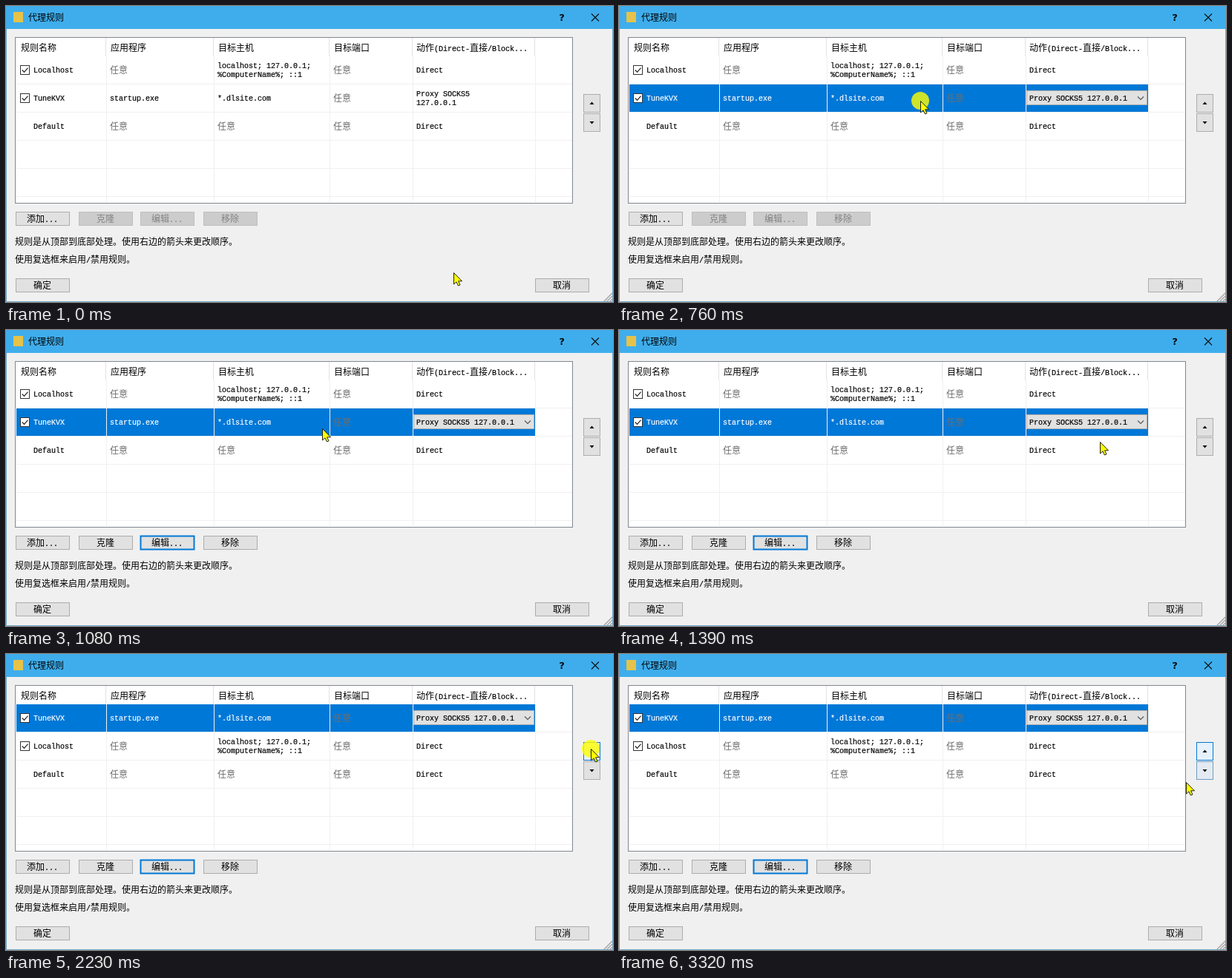
These frames come from a looping animation (818 by 400 pixels, 3.4 s). An HTML page:

```html
<!DOCTYPE html>
<html lang="zh-CN">
<head>
<meta charset="utf-8">
<title>代理规则</title>
<style>
html, body { margin: 0; width: 100%; height: 100%; overflow: hidden; background: #f0f0f0; }
svg { display: block; }
text {
  font: 10px "Liberation Mono", "DejaVu Sans Mono", monospace;
  fill: currentColor; stroke: currentColor; stroke-width: .2px; white-space: pre;
}
.zh { font: 12px "Noto Sans CJK SC", "Noto Sans CJK", sans-serif; stroke-width: 0; }
.mid { text-anchor: middle; }
.any { fill: #6d6d6d; }
.grid { stroke: #f0f0f0; fill: none; }
.btn rect { fill: #e1e1e1; stroke: #adadad; }
.arrow { fill: #000; }

/* One shared 3.4 s loop; every change is a hard step. */
.anim { animation: 3.4s step-end infinite; }
#cursor { animation-name: move; }
#click { animation-name: click; fill: #ff0; }
#mark, #combo { animation-name: select; }
#action { animation-name: deselect; }
#tuneText { animation-name: invert; }
#local { animation-name: down; }
#tune { animation-name: up; }
.late { animation-name: enable; }
.late rect { animation: enableBox 3.4s step-end infinite; }
#edit rect { animation-name: focusBox; }
#upBtn { animation-name: hoverUp; }
#downBtn { animation-name: hoverDown; }

@keyframes move {
  0% { transform: translate(603px, 360px); }
  6.17% { transform: translate(598px, 352px); }
  8.52% { transform: translate(571px, 313px); }
  10.88% { transform: translate(527px, 255px); }
  12.94% { transform: translate(483px, 200px); }
  15.29% { transform: translate(450px, 162px); }
  17.64% { transform: translate(426px, 142px); }
  20.29% { transform: translate(412px, 132px); }
  22.35% { transform: translate(406px, 128px); }
  29.41% { transform: translate(409px, 129px); }
  31.76% { transform: translate(426px, 133px); }
  33.82% { transform: translate(460px, 138px); }
  36.17% { transform: translate(507px, 143px); }
  38.52% { transform: translate(577px, 149px); }
  40.88% { transform: translate(648px, 151px); }
  43.23% { transform: translate(700px, 148px); }
  45.29% { transform: translate(736px, 142px); }
  47.64% { transform: translate(758px, 136px); }
  49.7% { transform: translate(770px, 132px); }
  52.05% { transform: translate(777px, 129px); }
  54.41% { transform: translate(784px, 128px); }
  56.47% { transform: translate(788px, 128px); }
  88.52% { transform: translate(787px, 132px); }
  90.88% { transform: translate(783px, 143px); }
  93.23% { transform: translate(776px, 156px); }
  95.29% { transform: translate(769px, 167px); }
  97.64%, 100% { transform: translate(764px, 173px); }
}
@keyframes click {
  0%, 27.35%, 70.29%, 100% { opacity: 0; }
  22.35%, 65.58% { opacity: .8; }
  24.7%, 67.94% { opacity: .5; }
}
@keyframes select { 0% { visibility: hidden; } 22.35%, 100% { visibility: visible; } }
@keyframes deselect { 0% { visibility: visible; } 22.35%, 100% { visibility: hidden; } }
@keyframes invert { 0% { color: #000; } 22.35%, 100% { color: #fff; } }
@keyframes down { 0% { transform: none; } 65.58%, 100% { transform: translateY(38px); } }
@keyframes up { 0% { transform: translateY(38px); } 65.58%, 100% { transform: none; } }
@keyframes enable { 0% { color: #838383; } 27.35%, 100% { color: #000; } }
@keyframes enableBox {
  0% { fill: #ccc; stroke: #bfbfbf; }
  27.35%, 100% { fill: #e1e1e1; stroke: #adadad; }
}
@keyframes focusBox {
  0% { fill: #ccc; stroke: #bfbfbf; stroke-width: 1px; }
  27.35%, 100% { fill: #e1e1e1; stroke: #0078d7; stroke-width: 2px; }
}
@keyframes hoverUp {
  0% { fill: #e1e1e1; stroke: #adadad; }
  54.41% { fill: #e3e9ee; stroke: #5793c2; }
  56.47%, 100% { fill: #e5f1fb; stroke: #0078d7; }
}
@keyframes hoverDown {
  0% { fill: #e1e1e1; stroke: #adadad; }
  93.23% { fill: #e4edf5; stroke: #4a92cb; }
  97.64%, 100% { fill: #e3eaf1; stroke: #6f9dc1; }
}
</style>
</head>
<body>
<svg width="818" height="400" viewBox="0 0 818 400">
  <defs>
    <g id="check">
      <rect x="19.5" y="80.5" width="12" height="12" fill="#fff" stroke="#333"/>
      <path d="M21.8 86.5l2.7 2.8 5-5.6" fill="none" stroke="#222" stroke-width="1.2"/>
    </g>
  </defs>

  <!-- window -->
  <rect width="818" height="400" fill="#f0f0f0"/>
  <path d="M.5 30V399.5H817.5V30" fill="none" stroke="#74a9cb"/>
  <rect width="818" height="31" fill="#3fadec"/>
  <rect x="10" y="8" width="13" height="14" fill="#e6c24a"/>
  <text class="zh" x="30" y="20">代理规则</text>
  <text class="mid" x="749" y="20" style="font:bold 13px 'Open Sans',sans-serif">?</text>
  <path d="M789 10.5l10 10m0-10l-10 10" stroke="#111" stroke-width="1.1"/>
  <path d="M806 399l11-11M810 399l7-7M814 399l3-3" stroke="#a0a0a0" stroke-width="1.3"/>

  <!-- table -->
  <rect x="12.5" y="42.5" width="751" height="224" fill="#fff" stroke="#828790"/>
  <path d="M134.5 43v25m145-25v25m156-25v25m112-25v25m165-25v25" stroke="#e2e2e2"/>
  <text class="zh" x="20" y="60.5">规则名称</text>
  <text class="zh" x="141" y="60.5">应用程序</text>
  <text class="zh" x="286" y="60.5">目标主机</text>
  <text class="zh" x="442" y="60.5">目标端口</text>
  <text x="553" y="60.5"><tspan class="zh">动作</tspan>(Direct-<tspan class="zh">直接</tspan>/Block...</text>
  <path class="grid" d="M14 105.5H763M14 143.5H763M14 181.5H763M14 219.5H763M14 257.5H763"/>

  <g id="tune" class="anim">
    <rect id="mark" class="anim" x="14" y="68" width="699" height="37" fill="#0078d7"/>
  </g>
  <path class="grid" d="M135.5 68V265M280.5 68V265M436.5 68V265M548.5 68V265M713.5 68V265"/>

  <g id="local" class="anim">
    <use href="#check"/>
    <text x="37" y="90">Localhost</text>
    <text class="zh any" x="140" y="90.5">任意</text>
    <text x="285" y="83.5">localhost; 127.0.0.1;</text>
    <text x="285" y="95.5">%ComputerName%; ::1</text>
    <text class="zh any" x="441" y="90.5">任意</text>
    <text x="553" y="90">Direct</text>
  </g>

  <g class="anim" style="animation-name:up">
    <use href="#check"/>
    <g id="tuneText" class="anim">
      <text x="37" y="90">TuneKVX</text>
      <text x="140" y="90">startup.exe</text>
      <text x="285" y="90">*.dlsite.com</text>
    </g>
    <text class="zh any" x="441" y="90.5">任意</text>
    <g id="action" class="anim">
      <text x="553" y="83.5">Proxy SOCKS5</text>
      <text x="553" y="95.5">127.0.0.1</text>
    </g>
    <g id="combo" class="anim">
      <rect x="549.5" y="76.5" width="162" height="19" fill="#e1e1e1" stroke="#adadad"/>
      <text x="553" y="90">Proxy SOCKS5 127.0.0.1</text>
      <path d="M699 84.5l4 4 4-4" fill="none" stroke="#555" stroke-width="1.1"/>
    </g>
  </g>

  <text x="37" y="166">Default</text>
  <text class="zh any" x="140" y="166.5">任意</text>
  <text class="zh any" x="285" y="166.5">任意</text>
  <text class="zh any" x="441" y="166.5">任意</text>
  <text x="553" y="166">Direct</text>

  <!-- buttons -->
  <g class="btn">
    <rect x="13.5" y="278.5" width="72" height="18"/>
    <text x="28" y="292"><tspan class="zh">添加</tspan>...</text>
  </g>
  <g class="btn late anim">
    <rect x="98.5" y="278.5" width="72" height="18"/>
    <text class="zh mid" x="134" y="292">克隆</text>
  </g>
  <g id="edit" class="btn late anim">
    <rect x="181.5" y="278.5" width="72" height="18"/>
    <text x="196" y="292"><tspan class="zh">编辑</tspan>...</text>
  </g>
  <g class="btn late anim">
    <rect x="266.5" y="278.5" width="72" height="18"/>
    <text class="zh mid" x="302" y="292">移除</text>
  </g>
  <g class="btn">
    <rect x="13.5" y="368.5" width="72" height="18"/>
    <text class="zh mid" x="49" y="382">确定</text>
    <rect x="713.5" y="368.5" width="72" height="18"/>
    <text class="zh mid" x="749" y="382">取消</text>
    <rect id="upBtn" class="anim" x="778.5" y="119.5" width="22" height="24"/>
    <rect id="downBtn" class="anim" x="778.5" y="145.5" width="22" height="24"/>
  </g>
  <path class="arrow" d="M786.5 133l3-3.5 3 3.5zM786.5 156l3 3.5 3-3.5z"/>

  <text class="zh" x="12" y="322.5">规则是从顶部到底部处理。使用右边的箭头来更改顺序。</text>
  <text x="12" y="346.5"><tspan class="zh">使用复选框来启用</tspan>/<tspan class="zh">禁用规则。</tspan></text>

  <g id="cursor" class="anim">
    <circle id="click" class="anim" r="12"/>
    <path d="M.5 .5V16L4 12.8 6.4 18 9 16.9 6.6 11.8H11.5Z" fill="#ff0" stroke="#222"/>
  </g>
</svg>
</body>
</html>
```
